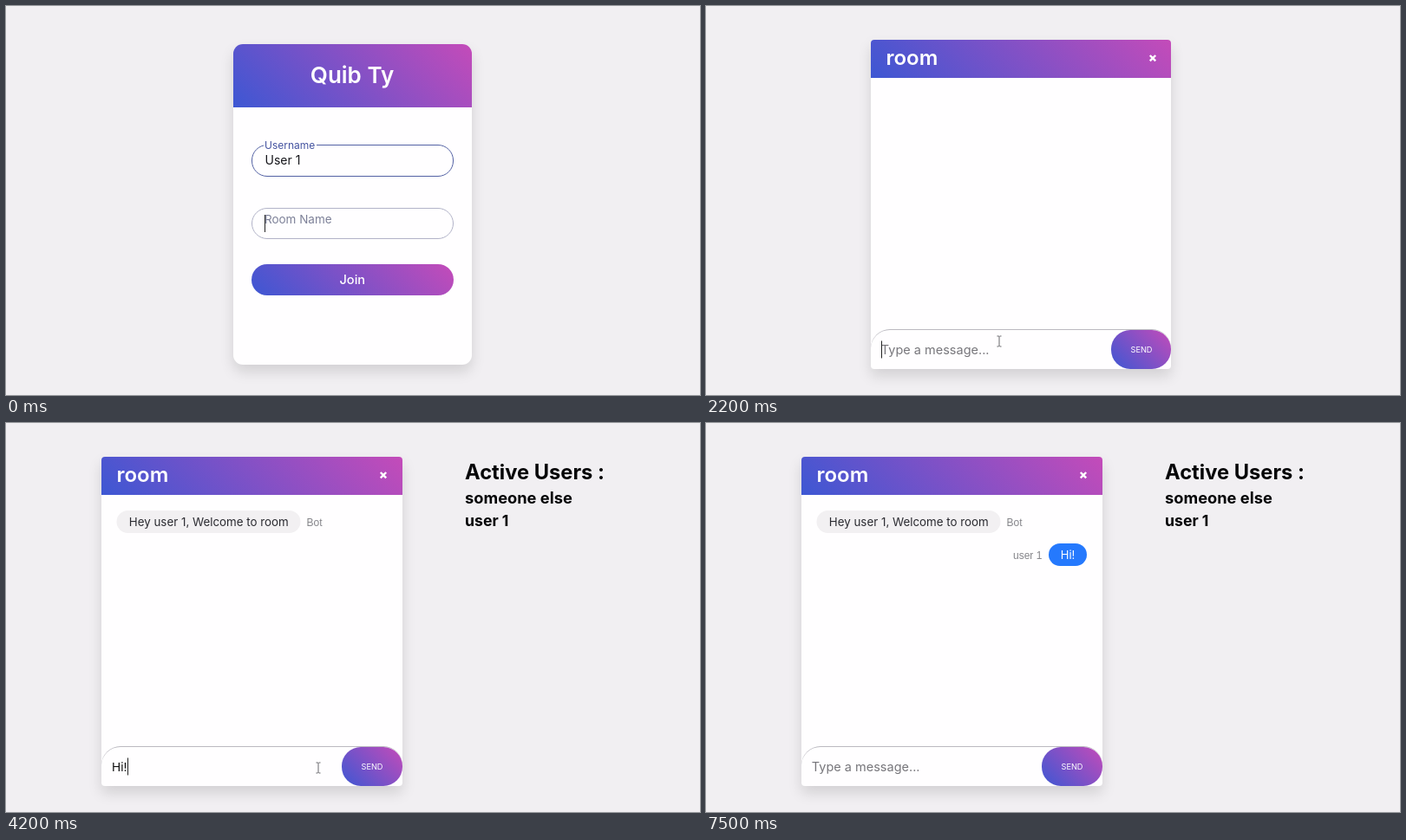
Recreate the animation shown at these times as an HTML page. Size 800 by 449 pixels, loop 8000 ms.

```html
<!DOCTYPE html>
<html lang="en">
<head>
<meta charset="utf-8">
<title>Chat room</title>
<style>
  html, body { margin: 0; width: 100%; height: 100%; overflow: hidden; background: #f1eff2; }
  #stage { position: relative; width: 800px; height: 449px; overflow: hidden; }
  .scene, svg { position: absolute; left: 0; top: 0; width: 800px; height: 449px; }
  #pointer { overflow: visible; }
  .box { position: absolute; box-sizing: border-box; }
  .card { background: #fffeff; box-shadow: 0 8px 16px rgba(0, 0, 0, .13); overflow: hidden; }
  .grad { background: linear-gradient(45deg, #3d57d3, #c44bb9); }
  .field { border: 1px solid #5361a4; border-radius: 18px; }
  .form { border-top: 1px solid #bbb9c0; border-radius: 22px; }
  text { font-family: Inter, sans-serif; white-space: pre; }
  .plain { font-family: "Liberation Sans", Arial, sans-serif; }
</style>
</head>
<body>
<div id="stage">
  <div class="scene" id="login"></div>
  <div class="scene" id="chat"></div>
  <svg id="pointer">
    <path id="arrow" d="M0 0V12.2L2.9 9.5L4.9 13.6L6.9 12.7L5 8.7H8.6Z"
      fill="#fff" stroke="#33333b" stroke-linejoin="round"/>
    <path id="beam" d="M-2.5 -6H-.7L0 -5.3L.7 -6H2.5M0 -5.3V5.3M-2.5 6H-.7L0 5.3L.7 6H2.5"
      fill="none" stroke="#66666b"/>
  </svg>
</div>
<script>
const LOOP = 8000, STEP = 100;
const $ = id => document.getElementById(id);
const SVG = 'http://www.w3.org/2000/svg';

function box(parent, cls, x, y, w, h, css = '') {
  const el = document.createElement('div');
  el.className = 'box ' + cls;
  el.style.cssText = `left:${x}px;top:${y}px;width:${w}px;height:${h}px;${css}`;
  return parent.appendChild(el);
}

function node(parent, tag, attrs) {
  const el = document.createElementNS(SVG, tag);
  for (const key in attrs) el.setAttribute(key, attrs[key]);
  return parent.appendChild(el);
}

function label(parent, str, x, y, size, fill, attrs = {}) {
  const el = node(parent, 'text', { x, y, 'font-size': size, fill, ...attrs });
  el.textContent = str;
  return el;
}

const caretBar = (parent, y) => node(parent, 'rect', { y, width: 1, height: 20, fill: '#222' });
const show = (el, on) => { el.style.visibility = on ? 'visible' : 'hidden'; };
const mix = (a, b, p) => a + (b - a) * p;
const mixColor = (a, b, p) => `rgb(${a.map((v, i) => Math.round(mix(v, b[i], p)))})`;
const latest = (table, t) => table.filter(row => row[0] <= t).pop()[1];

// Login form
const login = $('login');
const middle = { 'text-anchor': 'middle' };
const card = box(login, 'card', 261.5, 44, 275.5, 369.5, 'border-radius:11px');
box(card, 'grad', 0, 0, 275.5, 72.5);
box(login, 'field', 283, 160, 232.5, 36.5);
const roomField = box(login, 'field', 283, 232.5, 232.5, 36.5);
box(login, 'grad', 283, 297.5, 232.5, 36.5, 'border-radius:18.25px');
box(login, '', 297, 158, 61, 6, 'background:#fffeff');
const notch = box(login, '', 297, 230, 74, 6, 'background:#fffeff');
const loginInk = node(login, 'svg', {});
label(loginInk, 'Quib Ty', 399, 89, 26, '#fff', { ...middle, 'font-weight': 600 });
label(loginInk, 'Username', 298, 164.5, 12, '#4453a0');
label(loginInk, 'User 1', 298.5, 183, 14, '#15151a');
label(loginInk, 'Join', 399.3, 321, 14.6, '#fff', { ...middle, 'font-weight': 500 });
const roomLabel = label(loginInk, 'Room Name', 298, 237, 12.2, '');
const roomText = label(loginInk, '', 298.5, 255.5, 15.3, '#15151a');
const roomCaret = caretBar(loginInk, 241);

// Chat window, laid out in its left position
const chat = $('chat');
const win = box(chat, '', 0, 0, 800, 449);
const panel = box(win, 'card', 110, 39, 346.5, 379.5, 'border-radius:4px');
box(panel, 'grad', 0, 0, 346.5, 43.5);
box(win, 'form', 110, 373, 346.5, 45.5);
box(win, 'grad', 387, 374, 69.5, 44.5, 'border-radius:22px');
const winInk = node(win, 'svg', {});
label(winInk, 'room', 127.5, 68, 24, '#fff', { 'font-weight': 600 });
node(winInk, 'path', { d: 'M431.8 57L438.2 63.4M438.2 57L431.8 63.4', stroke: '#fff', 'stroke-width': 2.4 });
label(winInk, 'SEND', 422, 400, 9.2, '#fff', middle);
const hint = label(winInk, 'Type a message...', 121.8, 402, 14.5, '#77767b');
const draft = label(winInk, '', 122, 401.5, 13.7, '#111');
const draftCaret = caretBar(winInk, 386.5);

const welcome = node(winInk, 'g', {});
node(welcome, 'rect', { x: 127.5, y: 101, width: 212, height: 26, rx: 13, fill: '#f2f0f2' });
label(welcome, 'Hey user 1, Welcome to room', 141.8, 119, 13.35, '#2b2b31');
label(welcome, 'Bot', 346.5, 119, 12, '#85858a', { class: 'plain' });
[['Active Users :', 65.3, 23.7], ['someone else', 93, 18.3], ['user 1', 119.3, 17.7]]
  .forEach(([str, y, size]) => label(welcome, str, 529, y, size, '#050507', { 'font-weight': 700 }));

const reply = node(winInk, 'g', {});
node(reply, 'rect', { x: 395, y: 139, width: 44, height: 26, rx: 13, fill: '#2579fd' });
label(reply, 'Hi!', 417, 156.7, 13, '#fff', middle);
label(reply, 'user 1', 354, 156.7, 12, '#85858a', { class: 'plain' });

// Timeline
const ENTER = 1000, WELCOME = 2500, SENT = 5300;
const roomTyping = [[0, ''], [400, 'r'], [500, 'ro'], [600, 'roo'], [700, 'room']];
const draftTyping = [[0, ''], [3800, 'H'], [4000, 'Hi'], [4100, 'Hi!'], [SENT, '']];
const draftBlink = [[0, false], [2200, true], [2700, false], [3800, true],
  [4600, false], [5100, true], [5500, false]];
const pointerVisible = [[0, false], [800, true], [ENTER, false], [1400, true], [3800, false],
  [4200, true], [SENT, false]];
const pointerPath = [[0, 342, 182], [1300, 342, 182], [2000, 338, 387], [2800, 338, 387],
  [3200, 360, 398], [LOOP, 360, 398]];

function pointerAt(t) {
  const i = pointerPath.findIndex(row => row[0] > t);
  const [t0, x0, y0] = pointerPath[i - 1], [t1, x1, y1] = pointerPath[i];
  const p = (t - t0) / (t1 - t0), eased = p * p * (3 - 2 * p);
  return [mix(x0, x1, eased), mix(y0, y1, eased)];
}

function type(el, caret, str) {
  el.textContent = str;
  const width = str ? el.getComputedTextLength() + 0.5 : 0;
  caret.setAttribute('x', Math.round(+el.getAttribute('x') + width - 0.3));
}

function render(t) {
  const joined = t >= ENTER;
  login.style.display = joined ? 'none' : 'block';
  chat.style.display = joined ? 'block' : 'none';

  if (!joined) {
    const p = Math.min(1, 0.2 + t / 320);
    roomLabel.setAttribute('y', mix(255, 237, p));
    roomLabel.setAttribute('font-size', mix(13.8, 12.2, p));
    roomLabel.setAttribute('fill', mixColor([139, 139, 150], [68, 83, 160], p));
    roomField.style.borderColor = mixColor([202, 200, 209], [83, 97, 164], p);
    show(notch, p > 0.7);
    type(roomText, roomCaret, latest(roomTyping, t));
  } else {
    const str = latest(draftTyping, t);
    win.style.left = t < WELCOME ? '79.7px' : '0';
    welcome.style.display = t < WELCOME ? 'none' : 'inline';
    reply.style.display = t < SENT ? 'none' : 'inline';
    hint.style.display = str ? 'none' : 'inline';
    type(draft, draftCaret, str);
    draftCaret.style.display = latest(draftBlink, t) ? 'inline' : 'none';
  }

  const [x, y] = pointerAt(t), overInput = joined && y > 374;
  const visible = latest(pointerVisible, t);
  $('pointer').style.transform = `translate(${x}px, ${y}px)`;
  show($('arrow'), visible && !overInput);
  show($('beam'), visible && overInput);
}

const start = performance.now();
function tick() {
  const t = (performance.now() - start) % LOOP;
  render(Math.floor(t / STEP) * STEP);
  requestAnimationFrame(tick);
}
tick();
</script>
</body>
</html>
```
